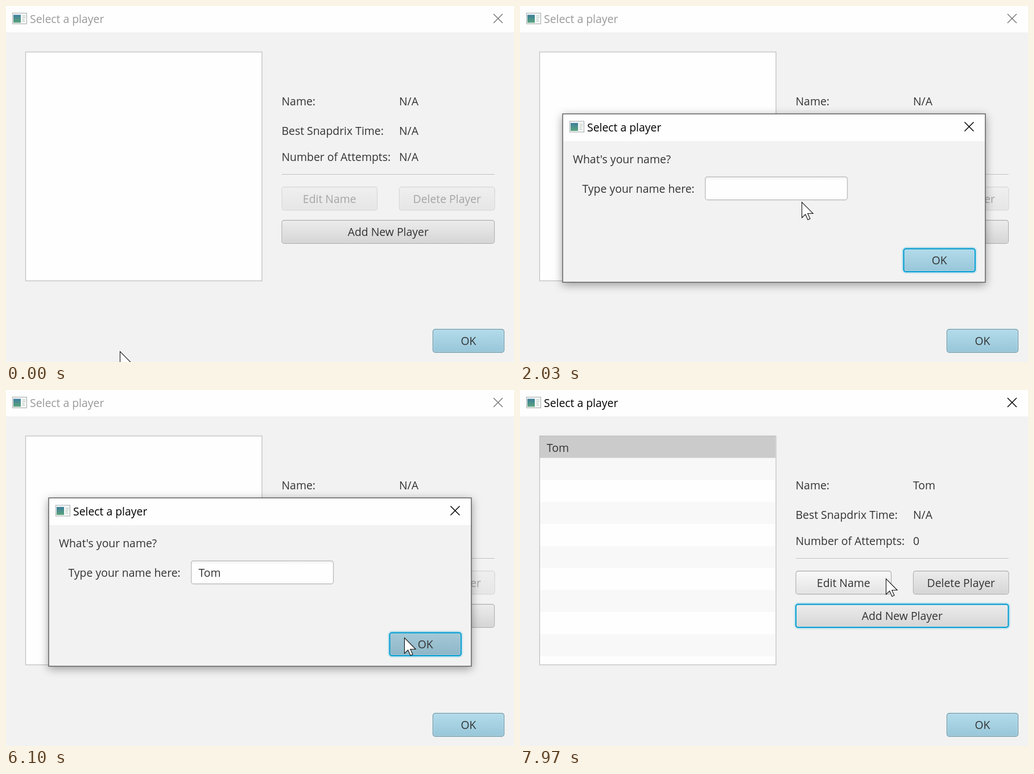
Write an HTML page that moves like this. It is 893x627 px and loops after 8 s.

```html
<!DOCTYPE html>
<html lang="en">
<head>
<meta charset="utf-8">
<title>Select a player</title>
<style>
  html, body { margin: 0; width: 100%; height: 100%; overflow: hidden; background: #f2f2f2; }
  svg { display: block; width: 893px; height: 627px; }
  text { font: 19.4px "Open Sans", "Noto Sans", sans-serif; fill: #333; white-space: pre; }
  .titlebar text { fill: #000; }
  .titlebar .close { stroke: #000; stroke-width: 1.5; fill: none; }
  .inactive text { fill: #999; }
  .inactive .close { stroke: #777; }
  .middle { text-anchor: middle; }
  .ring { fill: none; stroke: #039ed3; stroke-width: 2; }
  .glow { fill: none; stroke: #039ed3; stroke-opacity: .2; stroke-width: 4.5; }
  #dialog { transform-origin: 446px 338px; filter: drop-shadow(0 4px 8px rgba(0, 0, 0, .36)); }
</style>
</head>
<body>
<svg id="stage" viewBox="0 0 893 627"></svg>
<script>
const LOOP = 8000;
const PLAYER = "Tom";
const TIMES = {
  press: 1450, open: 1600, focusField: 2360, keys: [3600, 3860, 4080],
  confirm: 5960, close: 6190
};

// Pointer stops: time, x, y. It eases from each one to the next.
const POINTER = [
  [150, 200, 608], [1090, 582, 418], [1180, 582, 418], [1400, 598, 400],
  [1620, 598, 400], [2020, 495, 345], [2060, 495, 345], [2300, 471, 325],
  [5080, 471, 325], [5800, 700, 436], [7050, 700, 436], [7490, 652, 424],
  [7540, 652, 424], [7920, 643, 332]
];

const FILLS = {
  grey: ["#ececec", "#d5d5d5"], greyHover: ["#f9f9f9", "#e3e3e3"], greyPressed: ["#dadada", "#c8c8c8"],
  blue: ["#b3dbea", "#97c6d9"], blueHover: ["#c0e5f2", "#a5d3e5"], bluePressed: ["#a5c9d7", "#8db6c7"],
  inset: ["#f0f0f2", "#fefefe"], teal: ["#3d7d9c", "#5ca57c"]
};

const gradient = ([id, [top, bottom]]) =>
  `<linearGradient id="${id}" x2="0" y2="1"><stop stop-color="${top}"/>
   <stop offset="${id === "inset" ? .16 : 1}" stop-color="${bottom}"/></linearGradient>`;

const label = (x, y, text, attrs = "") => `<text x="${x}" y="${y}" ${attrs}>${text}</text>`;

const box = (x, y, w, h, attrs) => `<rect x="${x}" y="${y}" width="${w}" height="${h}" ${attrs}/>`;

const focusRing = (x, y, w, h) => `<g class="focus">
  ${box(x - 1, y - 1, w + 2, h + 2, 'rx="5" class="glow"')}
  ${box(x, y, w, h, 'rx="4" class="ring"')}</g>`;

function button(id, x, y, w, text, tone = "grey") {
  const border = tone === "blue" ? "#6f9cad" : "#b1b1b1";
  return `<g id="${id}">
    ${box(x, y, w, 40.5, `rx="4" class="face" fill="url(#${tone})" stroke="${border}" stroke-width="1.3"`)}
    ${box(x + 1.2, y + 1.2, w - 2.4, 38.1, 'rx="3" fill="none" stroke="#fff" stroke-opacity=".3"')}
    ${focusRing(x, y, w, 40.5)}
    ${label(x + w / 2, y + 27.5, text, 'class="middle"')}</g>`;
}

function titlebar(id, x, y, w, h, closeX) {
  const icon = `<g transform="translate(${x + 11.5} ${y + 12.5})">
    ${box(0, 0, 25, 19, 'fill="#f7f8f8" stroke="#a3a9ad"')}
    ${box(1.5, 3, 13, 14, 'fill="url(#teal)"')}
    <path d="M17 5h6M17 8h6M17 11h4M17 14h5" stroke="#a9c0b2"/></g>`;
  return `<g id="${id}" class="titlebar">${box(x, y, w, h, 'fill="#fefefe"')}${icon}
    ${label(x + 42, y + 30, "Select a player")}
    <path class="close" d="M${closeX - 8} ${y + 14}l16 16m0-16l-16 16"/></g>`;
}

const rows = Array.from({ length: 11 }, (_, i) => {
  const y = 81 + i * 38.8;
  return box(35, y, 414, Math.min(38.8, 483.5 - y), `fill="${i ? (i % 2 ? "#f8f8f8" : "#fefefe") : "#cbcbcb"}"`);
}).join("");

const stage = document.getElementById("stage");
stage.innerHTML = `
  <defs>${Object.entries(FILLS).map(gradient).join("")}</defs>
  ${box(0, 0, 893, 627, 'fill="#f2f2f2"')}
  ${titlebar("mainTitle", 0, 0, 893, 46.5, 865)}
  ${box(34.5, 81, 415.5, 403, 'fill="#fefefe"')}
  <g id="rows">${rows}${label(47, 108.5, PLAYER)}</g>
  ${box(34.5, 81, 415.5, 403, 'fill="none" stroke="#bdbdbd" stroke-width="1.2"')}
  ${label(484.5, 174.5, "Name:")}${label(691, 174.5, "N/A", 'id="name"')}
  ${label(484.5, 227, "Best Snapdrix Time:")}${label(691, 227, "N/A")}
  ${label(484.5, 272.5, "Number of Attempts:")}${label(691, 272.5, "N/A", 'id="attempts"')}
  <path d="M485 296.5h374" stroke="#c2c2c8" stroke-width="1.2"/>
  ${button("edit", 485, 319, 167.5, "Edit Name")}
  ${button("delete", 691.5, 319, 167.5, "Delete Player")}
  ${button("add", 485, 377.5, 373.5, "Add New Player")}
  ${button("mainOk", 750.5, 569.5, 125, "OK", "blue")}
  <g id="dialog">
    ${box(75, 190, 743, 296.5, 'fill="#f2f2f2"')}
    ${titlebar("dialogTitle", 76, 190.5, 741, 47.5, 789.5)}
    ${box(75, 190, 743, 296.5, 'fill="none" stroke="#5a5a5a" stroke-width="1.4"')}
    ${label(93, 276.5, "What's your name?")}
    ${label(109.5, 328.5, "Type your name here:")}
    <g id="field">
      ${box(325.7, 300.8, 249.8, 40.7, 'rx="4" fill="url(#inset)" stroke="#bababa" stroke-width="1.3"')}
      ${focusRing(325.7, 300.8, 249.8, 40.7)}
      ${label(338.5, 328.5, "", 'id="typed"')}
      <path id="caret" d="M0 308v27" stroke="#222" stroke-width="1.5"/>
    </g>
    ${button("dialogOk", 674.5, 427.5, 125.5, "OK", "blue")}
  </g>
  <path id="arrow" d="M.5 .5V28l6.2-6 4.3 9.5 4-1.8-4.2-9.2h9.4z" fill="#fff" stroke="#111" stroke-width="1.1"/>
  <path id="beam" d="M-7-13h4.5Q0-13 0-11Q0-13 2.5-13H7M-7 13h4.5Q0 13 0 11Q0 13 2.5 13H7M0-12V12"
    fill="none" stroke="#000" stroke-width="2.4"/>`;

const get = id => document.getElementById(id);
const show = (element, visible) => { element.style.display = visible ? "" : "none"; };
const clamp = v => Math.min(1, Math.max(0, v));
const progress = (t, start, length) => clamp((t - start) / length);
const ease = p => p * p * (3 - 2 * p);

function pointerAt(t) {
  const next = POINTER.findIndex(stop => stop[0] > t);
  if (next === 0) return POINTER[0].slice(1);
  if (next < 0) return POINTER.at(-1).slice(1);
  const [t0, x0, y0] = POINTER[next - 1], [t1, x1, y1] = POINTER[next];
  const p = ease((t - t0) / (t1 - t0));
  return [x0 + (x1 - x0) * p, y0 + (y1 - y0) * p];
}

function setButton(id, tone, { hover, pressed, focused, disabled }) {
  const group = get(id);
  const state = pressed ? "Pressed" : hover ? "Hover" : "";
  group.querySelector(".face").setAttribute("fill", `url(#${tone}${state})`);
  group.style.opacity = disabled ? .4 : 1;
  show(group.querySelector(".focus"), focused);
}

function drawMain(t, over) {
  const added = t >= TIMES.close, modal = t >= TIMES.open && !added;
  const active = t >= TIMES.press && !modal;
  get("mainTitle").classList.toggle("inactive", !active);
  show(get("rows"), added);
  get("name").textContent = added ? PLAYER : "N/A";
  get("attempts").textContent = added ? "0" : "N/A";
  setButton("edit", "grey", { disabled: !added, hover: added && over(485, 319, 167.5, 41) });
  setButton("delete", "grey", { disabled: !added });
  setButton("add", "grey", {
    hover: !modal && over(485, 377, 373.5, 42),
    pressed: t >= TIMES.press && t < TIMES.press + 100,
    focused: active
  });
  setButton("mainOk", "blue", {});
}

function drawDialog(t, over) {
  const opened = ease(progress(t, TIMES.open, 190));
  const closed = ease(progress(t, TIMES.close, 150));
  const visible = opened * (1 - closed);
  const dialog = get("dialog");
  show(dialog, visible > 0);
  dialog.style.opacity = visible;
  dialog.style.transform = `scale(${.92 + .08 * visible})`;

  const editing = t >= TIMES.focusField && t < TIMES.confirm;
  const keysDown = TIMES.keys.filter(key => t >= key);
  const typed = get("typed");
  typed.textContent = PLAYER.slice(0, keysDown.length);
  show(get("field").querySelector(".focus"), editing);

  const lastInput = keysDown.at(-1) ?? TIMES.focusField;
  const caret = get("caret");
  show(caret, editing && (t - lastInput) % 1000 < 500);
  const textWidth = keysDown.length ? typed.getComputedTextLength() : 0;
  caret.setAttribute("transform", `translate(${339 + textWidth} 0)`);

  setButton("dialogOk", "blue", {
    hover: over(674, 427, 126, 41),
    pressed: t >= TIMES.confirm,
    focused: !editing
  });
}

function draw(t) {
  const [x, y] = pointerAt(t);
  const over = (left, top, w, h) => x >= left && x <= left + w && y >= top && y <= top + h;
  drawMain(t, over);
  drawDialog(t, over);

  const overField = t >= TIMES.open && t < TIMES.close && over(325, 300, 251, 42);
  show(get("arrow"), !overField);
  show(get("beam"), overField);
  get(overField ? "beam" : "arrow").setAttribute("transform", `translate(${x} ${y})`);
}

const start = performance.now();
function tick() {
  draw((performance.now() - start) % LOOP);
  requestAnimationFrame(tick);
}
tick();
</script>
</body>
</html>
```
